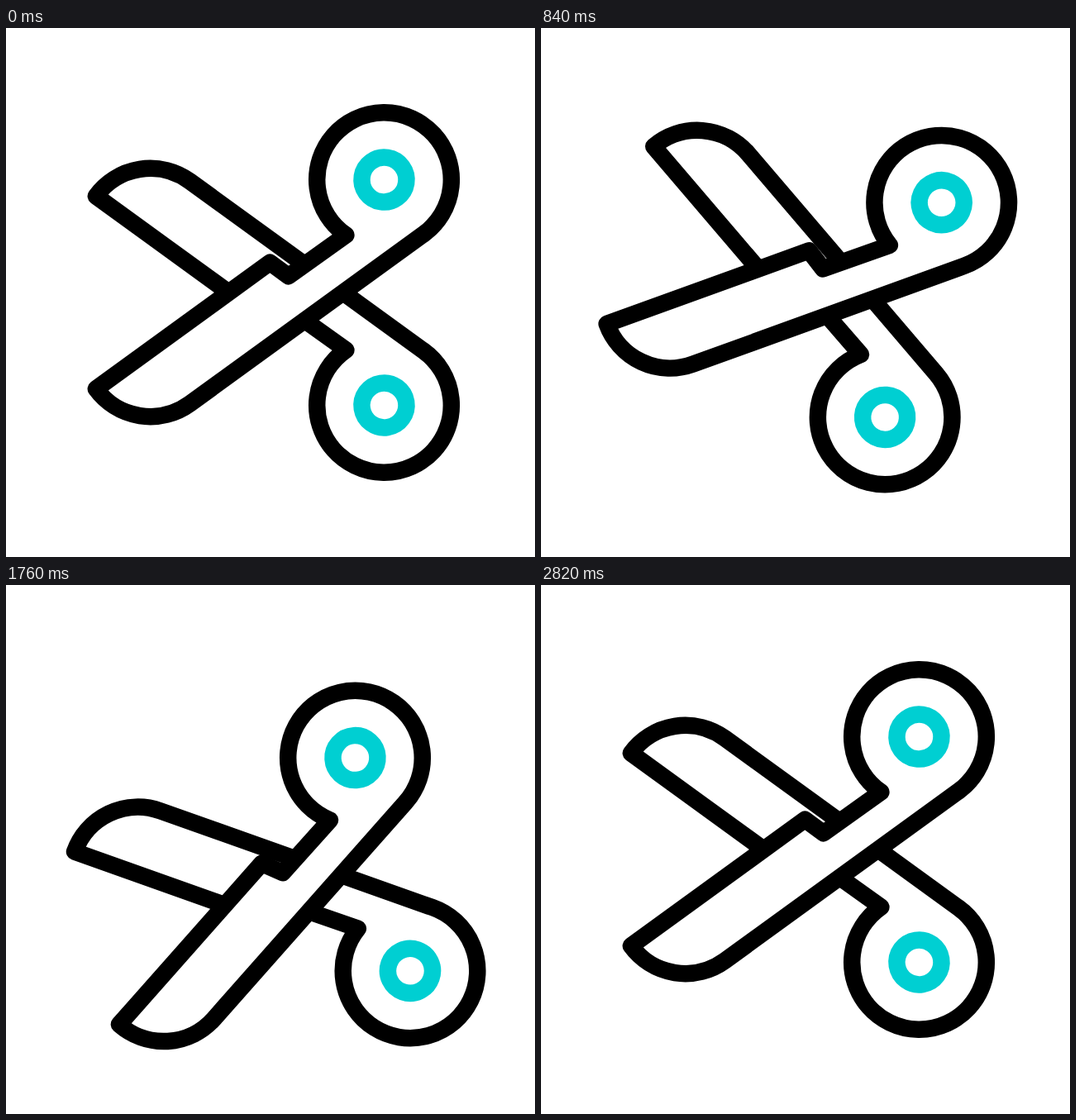
These frames come from a looping animation (640 by 640 pixels, 3.6 s). An HTML page:

```html
<!DOCTYPE html>
<html lang="en">
<head>
<meta charset="utf-8">
<title>Scissors</title>
<style>
  html, body { margin: 0; width: 100%; height: 100%; overflow: hidden; background: #fff; }
  svg { display: block; width: 100%; height: 100%; }
</style>
</head>
<body>
<svg viewBox="0 0 640 640">
  <defs>
    <!-- One half of the scissors, with the pivot at the origin -->
    <g id="half" stroke-width="20.5" stroke-linejoin="round" fill="#fff">
      <path stroke="#000" d="M-272.9 -54 H-12.8 L-4.3 -27.5 L81.3 -26.9
        A81.3 81.3 0 1 1 157.9 27.3 H-191.6 A81.3 81.3 0 0 1 -272.9 -54 Z"/>
      <circle cx="157.9" cy="-54" r="27" stroke="#00cfd2"/>
    </g>
  </defs>
  <use id="back" href="#half"/>
  <use id="front" href="#half"/>
</svg>
<script>
const LOOP = 3600, STEP = 20, SNIP = 940, SNIPS = 3;
const OPEN = 35.97, CLOSED = 13.05;

// Easing curve through (0,0), (x1,0), (x2,1), (1,1)
const bezier = (x1, x2) => x => {
  let lo = 0, hi = 1;
  for (let i = 0; i < 30; i++) {
    const t = (lo + hi) / 2, r = 1 - t;
    if (3 * r * r * t * x1 + 3 * r * t * t * x2 + t * t * t < x) lo = t;
    else hi = t;
  }
  return lo * lo * (3 - 2 * lo);
};
const mix = (a, b, k) => a + (b - a) * k;

const closing = bezier(0.52, 0.37);
const opening = bezier(0.6, 0.4);
const drift = bezier(0.5, 0.5);
const late = bezier(0.6, 0.45);
const tilting = [late, opening, late];

// Pose of the whole tool when it is fully open; bend curves the way to the next one
const poses = [
  { x: 361.4, y: 320, tilt: 0, bend: 0 },
  { x: 354.5, y: 315.7, tilt: -15, bend: -7.2 },
  { x: 358.5, y: 364.3, tilt: 15, bend: 0 },
  { x: 361.4, y: 320, tilt: 0, bend: 0 }
];

const front = document.getElementById("front");
const back = document.getElementById("back");

function draw(ms) {
  const t = Math.min(Math.floor((ms % LOOP) / STEP) * STEP, SNIP * SNIPS);
  const n = Math.min(Math.floor(t / SNIP), SNIPS - 1);
  const s = t / SNIP - n;
  const a = poses[n], b = poses[n + 1];

  const k = drift(s);
  const x = mix(a.x, b.x, k) + a.bend * k * (1 - k);
  const y = mix(a.y, b.y, k);
  const tilt = mix(a.tilt, b.tilt, tilting[n](s));
  const spread = s < 0.5
    ? mix(OPEN, CLOSED, closing(s * 2))
    : mix(CLOSED, OPEN, opening(s * 2 - 1));

  const place = `translate(${x} ${y})`;
  front.setAttribute("transform", `${place} rotate(${-spread - tilt})`);
  back.setAttribute("transform", `${place} rotate(${spread - tilt}) scale(1 -1)`);
}

const start = performance.now();
function tick() {
  draw(performance.now() - start);
  requestAnimationFrame(tick);
}
tick();
</script>
</body>
</html>
```
